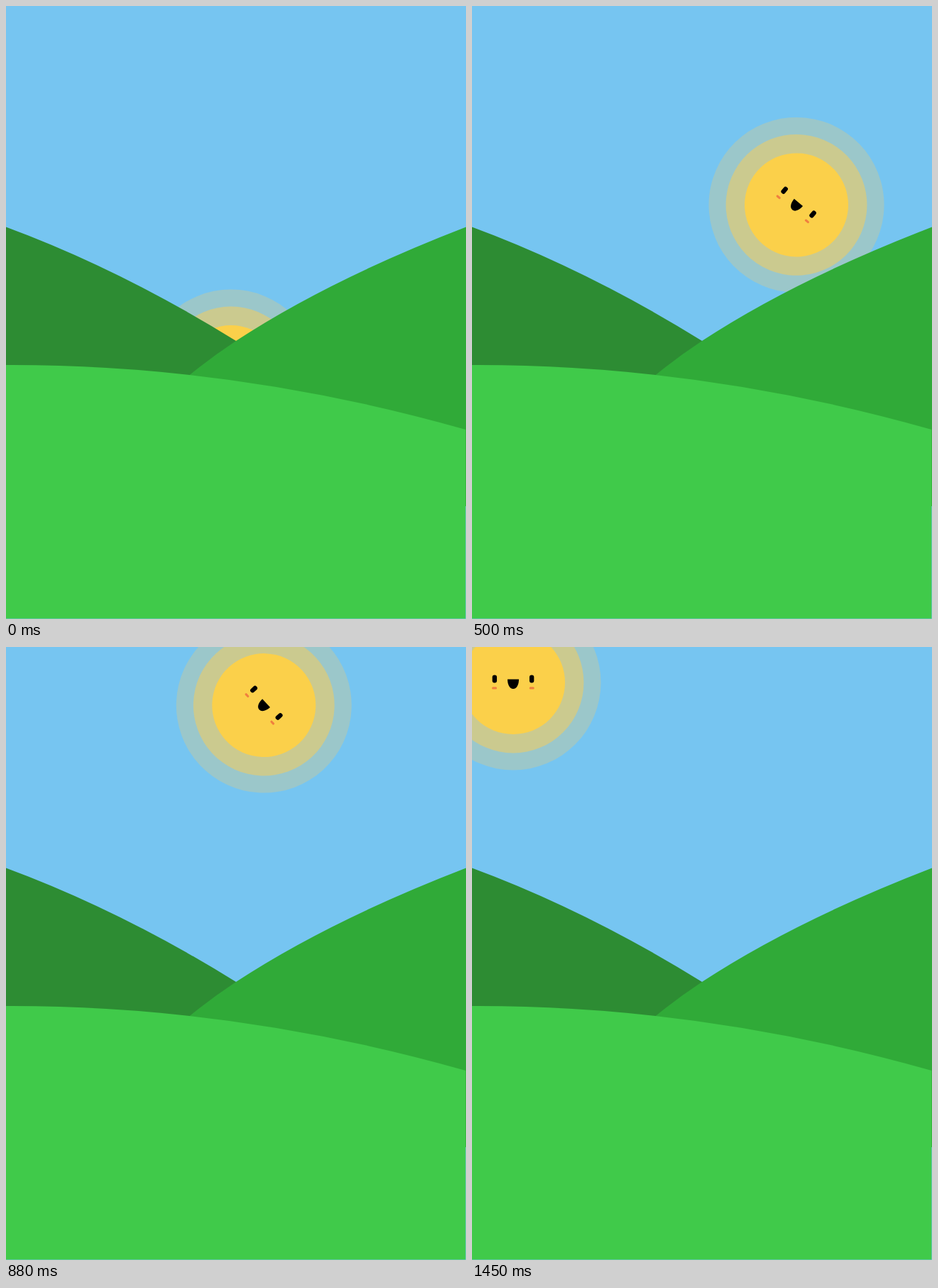
An HTML page that plays this animation: 648 px wide and 864 px high, repeating every 2310 ms.

```html
<!DOCTYPE html>
<html lang="en">
<head>
<meta charset="utf-8">
<title>Sunrise</title>
<style>
  html, body { margin: 0; height: 100%; overflow: hidden; background: #76c5f1; }
  svg { display: block; width: 100%; height: 100%; }
</style>
</head>
<body>
<svg viewBox="0 0 648 864">
  <rect width="648" height="864" fill="#76c5f1"/>
  <g id="sun">
    <circle r="123.5" fill="#9bc7ca"/>
    <circle r="99.4" fill="#cbca8f"/>
    <circle r="73" fill="#fbd04a"/>
    <g fill="#f0803f">
      <rect x="-30" y="6.3" width="7" height="3.2" rx="1.5"/>
      <rect x="22.7" y="6.3" width="7" height="3.2" rx="1.5"/>
    </g>
    <rect x="-29.4" y="-10.4" width="6.4" height="11" rx="3"/>
    <rect x="22.9" y="-10.4" width="6.4" height="11" rx="3"/>
    <path d="M-8-4.5H8C8 3 5 9 0 9S-8 3-8-4.5Z"/>
  </g>
  <path fill="#2d8c33" d="M0 311.5Q161.6 371.3 324 472L330 600H0Z"/>
  <path fill="#30aa38" d="M200 566L260 519Q290 494.5 324 472Q455 386 648 311.5V705H200Z"/>
  <path fill="#40ca4a" d="M0 506Q323 504.8 647.4 597V863.4H0Z"/>
</svg>
<script>
  const LOOP = 2310, LAST = 46;
  const longSteps = [3, 11, 22, 26, 28, 31, 35];
  const sun = document.getElementById('sun');

  // The picture advances in steps of 30 ms, a few of them 40 ms.
  function stepAt(t) {
    let k = 0;
    for (; k < LAST; k++) {
      t -= longSteps.includes(k) ? 40 : 30;
      if (t < 0) break;
    }
    return k;
  }

  function draw(now) {
    const p = Math.min(1, Math.max(0, (stepAt(now % LOOP) - 0.35) / 45));
    const angle = (61.3 - 180 * p) * Math.PI / 180;
    const x = 187.5 + 269.6 * Math.cos(angle);
    const y = 286.5 + 269.6 * Math.sin(angle);
    const tilt = p * (1 - p) * (149.4 + 81 * p);
    sun.setAttribute('transform', `translate(${x} ${y}) rotate(${tilt})`);
  }

  let start;
  function tick(now) {
    start ??= now;
    draw(now - start);
    requestAnimationFrame(tick);
  }
  draw(0);
  requestAnimationFrame(tick);
</script>
</body>
</html>
```
